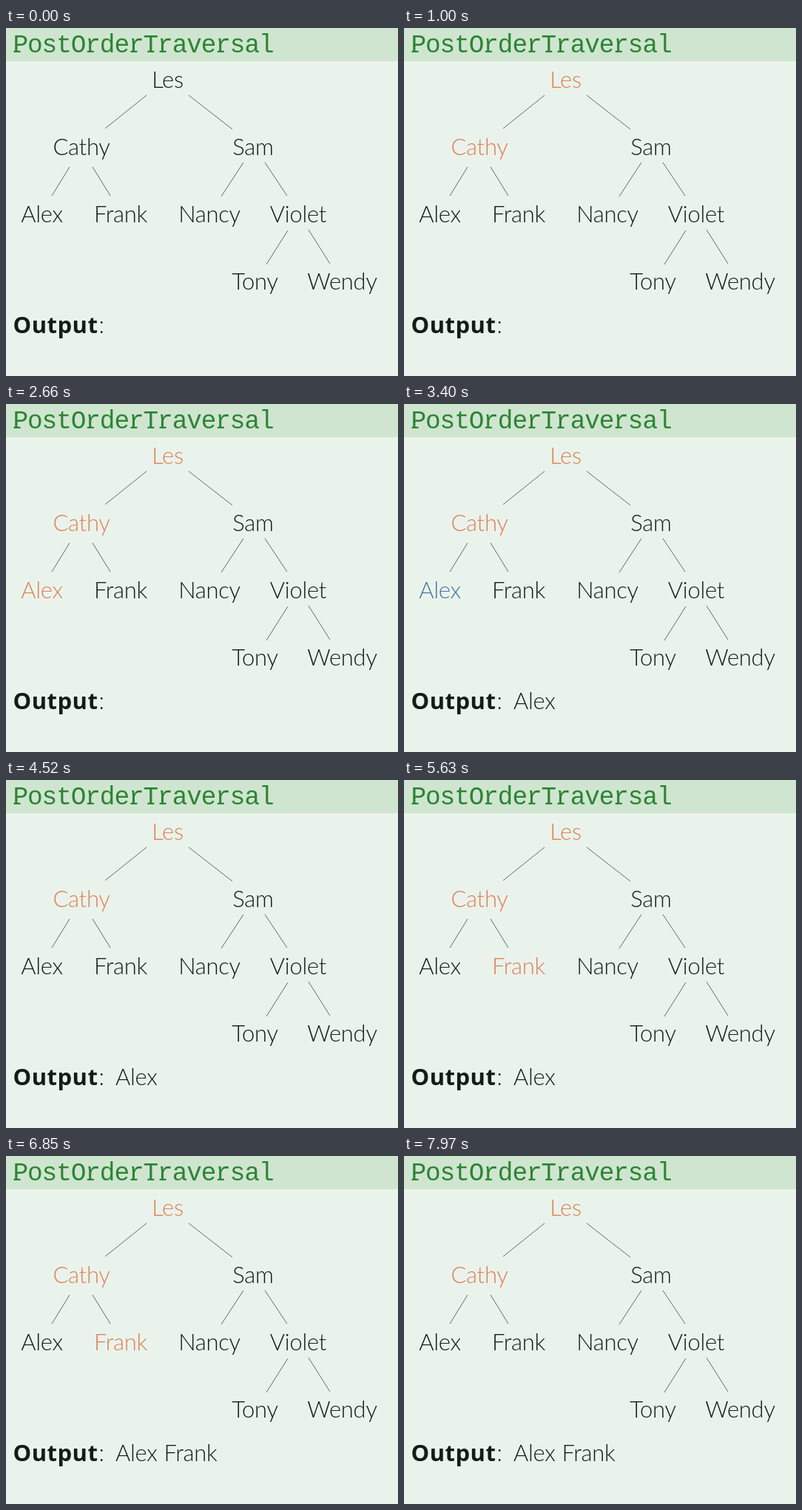
An HTML page for the animation above (8 s loop, 530 px wide and 471 px high).

```html
<!DOCTYPE html>
<html lang="en">
<head>
<meta charset="utf-8">
<title>Post-order traversal</title>
<style>
  html, body { margin: 0; width: 100%; height: 100%; overflow: hidden; background: #eaf3eb; }
  svg { display: block; width: 100%; height: 100%; }
  text { font: 300 31px Lato, "Open Sans", sans-serif; letter-spacing: -0.3px; fill: #141c18; }
  .title { font: 400 34.4px "Liberation Mono", monospace; letter-spacing: -1.08px; fill: #2c8434; }
  .label { font: 600 31px "Noto Sans", "Open Sans", sans-serif; letter-spacing: 0.5px; }
  .node { text-anchor: middle; }
</style>
</head>
<body>
<svg id="stage" viewBox="0 0 530 471">
  <rect width="530" height="471" fill="#eaf3eb"/>
  <rect width="530" height="45" fill="#cfe5cf"/>
  <text class="title" x="9.5" y="33">PostOrderTraversal</text>
  <path id="feet" stroke="#2c8434" stroke-width="2.2"/>
  <path id="edges" stroke="#646b66" stroke-width="1" fill="none"/>
  <text class="label" x="9.5" y="413">Output</text>
  <text x="125.5" y="413">:</text>
</svg>
<script>
const LOOP = 8000;
const INK = '#141c18', ORANGE = '#de8058', BLUE = '#4676a6';
const stage = document.getElementById('stage');

function addText(str, x, y, cls) {
  const el = document.createElementNS('http://www.w3.org/2000/svg', 'text');
  el.setAttribute('x', x);
  el.setAttribute('y', y);
  if (cls) el.setAttribute('class', cls);
  el.textContent = str;
  stage.appendChild(el);
  return el;
}

const segments = list => list.map(([a, b, c, d]) => `M${a} ${b}L${c} ${d}`).join('');

document.getElementById('edges').setAttribute('d', segments([
  [190, 91, 134, 136], [247, 91, 306, 137],
  [86, 188, 62, 227], [117, 188, 141, 227],
  [321, 182, 291, 228], [350, 182, 380, 227],
  [381, 274, 352, 320], [409, 273, 438, 319]
]));

// Slab feet under P, r and T: letter index, centre within the cell
document.getElementById('feet').setAttribute('d', segments(
  [[0, 5], [5, 6.5], [8, 6.5], [9, 9.8], [10, 6.5], [14, 6.5]].map(([i, c]) => {
    const x = 10 + i * 19.56 + c;
    return [x - 4.5, 31.9, x + 4.5, 31.9];
  })
));

const nodes = {};
[
  ['Les', 218.5, 80.5], ['Cathy', 102, 172], ['Sam', 334, 172],
  ['Alex', 48.5, 263], ['Frank', 155, 263], ['Nancy', 275, 263],
  ['Violet', 395, 263], ['Tony', 336.5, 354], ['Wendy', 454.5, 354]
].forEach(([name, x, y]) => nodes[name] = addText(name, x, y, 'node'));

const output = [
  { at: 2680, el: addText('Alex', 148, 413) },
  { at: 5900, el: addText('Frank', 213.5, 413) }
];

// Colour changes per node: [time, colour]
const changes = {
  Les: [[80, ORANGE]],
  Cathy: [[980, ORANGE]],
  Alex: [[1960, ORANGE], [3370, BLUE], [4220, INK]],
  Frank: [[5070, ORANGE], [6900, BLUE], [7600, INK]]
};

function draw(t) {
  for (const name in changes) {
    let fill = INK;
    for (const [at, colour] of changes[name]) if (t >= at) fill = colour;
    nodes[name].style.fill = fill;
  }
  for (const { at, el } of output) el.style.visibility = t >= at ? 'visible' : 'hidden';
}

const start = performance.now();
function tick() {
  draw((performance.now() - start) % LOOP);
  requestAnimationFrame(tick);
}
tick();
</script>
</body>
</html>
```
